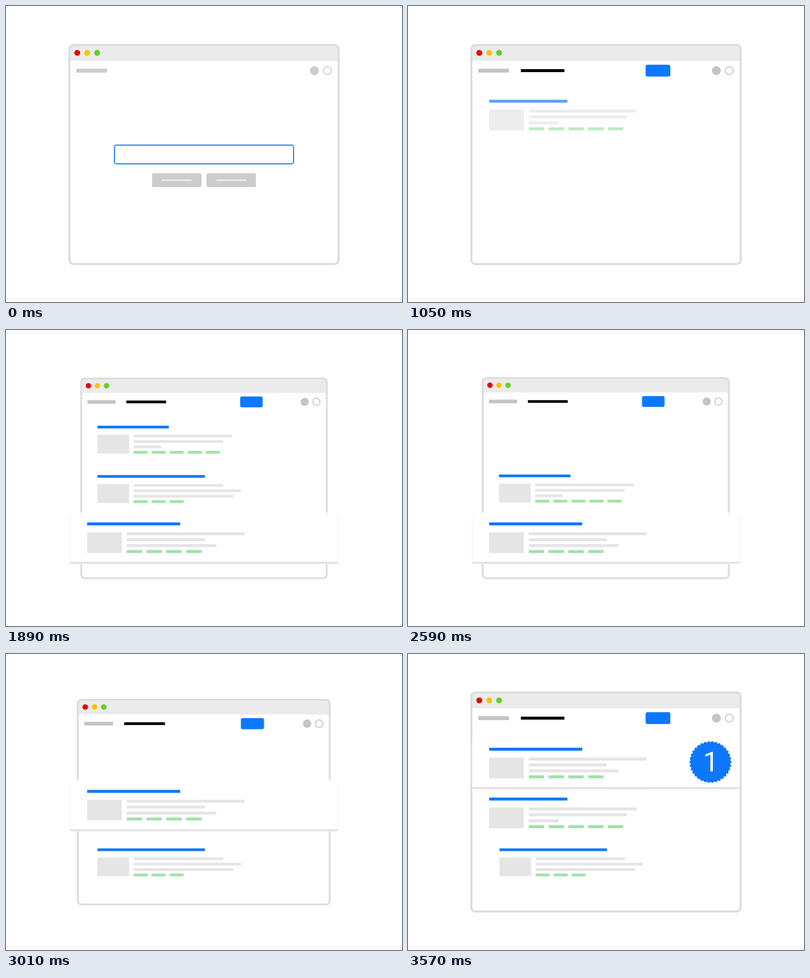
An HTML page that plays this animation: 800 by 600 pixels, repeating every 8000 ms.

```html
<!DOCTYPE html>
<html lang="en">
<head>
<meta charset="utf-8">
<title>Search ranking</title>
<style>
  html, body { margin: 0; width: 100%; height: 100%; overflow: hidden; background: #fff; }
  svg { display: block; width: 800px; height: 600px; }

  [class] { animation: 8s linear infinite both; }
  .type   { animation-name: type; transform-origin: 234px 300px; }
  .home   { animation-name: leave; }
  .bar    { animation-name: enter; }
  .greys  { animation-name: greys; }
  .window { animation-name: window; transform-origin: 400px 298px; }
  .first  { animation-name: first; transform-origin: 400px 236px; }
  .second { animation-name: second; transform-origin: 400px 336px; }
  .third  { animation-name: rise; }
  .card   { animation-name: lift; }
  .badge  { animation-name: badge; }
  .result { animation-name: appear; }
  .second .result { animation-delay: 140ms; }
  .third .result  { animation-delay: 280ms; }

  @keyframes type { 0% { transform: scaleX(0); } 7%, 100% { transform: none; } }
  @keyframes leave { 0%, 8.75% { opacity: 1; } 10.5%, 100% { opacity: 0; } }
  @keyframes enter { 0%, 8.75% { opacity: 0; } 10.5%, 100% { opacity: 1; } }
  @keyframes greys { 0%, 8.75% { color: #ccc; } 10.5%, 100% { color: #c4c4c4; } }
  @keyframes appear { 0%, 11.375% { opacity: 0; } 14%, 100% { opacity: 1; } }
  @keyframes lift { 0%, 19.25% { opacity: 0; } 23.625%, 100% { opacity: 1; } }
  @keyframes badge { 0%, 42.875% { opacity: 0; } 44.625%, 100% { opacity: 1; } }

  @keyframes window {
    0%, 19.25% { transform: translate(0, 0) scale(1); }
    23.625%, 32.37% { transform: translate(0, 0) scale(.912); }
    32.375%, 36.75% { transform: translate(-.5px, -.5px) scale(.914); }
    40.25%, 100% { transform: translate(0, -1px) scale(1); }
  }
  @keyframes first {
    0%, 19.25% { transform: translate(0, 0) scale(1); }
    23.625%, 32.37% { transform: translate(0, 0) scale(.912); }
    32.375%, 36.75% { transform: translate(-.5px, 99px) scale(.914); }
    40.25%, 100% { transform: translate(0, 101px) scale(1); }
  }
  @keyframes second {
    0%, 19.25% { transform: translate(0, 0) scale(1); opacity: 1; }
    23.625%, 32.37% { transform: translate(0, 0) scale(.912); opacity: 1; }
    32.375%, 36.74% { transform: translate(0, 100px) scale(.912); opacity: 0; }
    36.75%, 100% { transform: translate(0, 100px) scale(.912); opacity: 1; }
  }
  /* quadratic ease in, then out */
  @keyframes rise {
    0% { transform: translateY(0); }
    32.978% { transform: translateY(0); animation-timing-function: cubic-bezier(.3333, 0, .6667, .3333); }
    37.297% { transform: translateY(-100px); animation-timing-function: cubic-bezier(.3333, .6667, .6667, 1); }
    41.616%, 100% { transform: translateY(-200px); }
  }
</style>
</head>
<body>
<svg viewBox="0 0 800 600">
  <defs>
    <linearGradient id="shade" x2="0" y2="1">
      <stop offset=".94" stop-color="#ececec"/>
      <stop offset=".95" stop-color="#d8d8d8"/>
      <stop offset=".98" stop-color="#ebebeb"/>
      <stop offset="1" stop-color="#f0f0f0"/>
    </linearGradient>
  </defs>

  <g class="window">
    <rect x="128" y="79" width="544" height="444" rx="8" fill="#fff"/>
    <path d="M130 111V87q0-6 6-6H664q6 0 6 6V111z" fill="#ebebeb"/>
    <rect x="128" y="79" width="544" height="444" rx="8" fill="none" stroke="#dcdcdc" stroke-width="4"/>
    <circle cx="144" cy="95" r="6" fill="#e40600"/>
    <circle cx="164" cy="95" r="6" fill="#ffc200"/>
    <circle cx="184" cy="95" r="6" fill="#5fd21f"/>

    <g class="greys" fill="currentColor">
      <rect x="142" y="127" width="62" height="8"/>
      <circle cx="623" cy="131" r="9"/>
      <circle cx="649" cy="131" r="8" fill="#fff" stroke="currentColor" stroke-width="2"/>
    </g>

    <g class="home">
      <rect x="219" y="282" width="362" height="38" rx="4" fill="#fff" stroke="#0d78ff" stroke-width="2"/>
      <rect class="type" x="234" y="296" width="100" height="8"/>
      <g fill="#ccc">
        <rect x="295" y="339" width="100" height="28" rx="4"/>
        <rect x="405" y="339" width="100" height="28" rx="4"/>
      </g>
      <path d="M315 353h60M425 353h60" stroke="#e5e5e5" stroke-width="4"/>
    </g>

    <g class="bar">
      <rect x="228" y="128" width="88" height="6"/>
      <rect x="480" y="119" width="50" height="24" rx="4" fill="#0d78ff"/>
    </g>
  </g>

  <g class="first"></g>
  <g class="second"></g>
  <g class="third">
    <g class="card">
      <rect x="129" y="374" width="542" height="101" rx="6" fill="url(#shade)"/>
      <rect x="130" y="370" width="540" height="100" fill="#fff"/>
    </g>
  </g>

  <g class="badge">
    <polygon id="star" fill="#0d78ff"/>
    <text x="596.1" y="238" font-family="Roboto, sans-serif" font-size="56" fill="#fff">1</text>
  </g>
</svg>
<script>
  const $ = s => document.querySelector(s);
  const bar = (x, y, w, fill, h = 6) =>
    `<rect x="${x}" y="${y}" width="${w}" height="${h}" fill="${fill}"/>`;

  function addResult(parent, y, title, lines, tags) {
    let out = bar(164, y, title, '#0d78ff') + bar(164, y + 20, 70, '#e5e5e5', 42);
    lines.forEach((w, i) => out += bar(244, y + 20 + 12 * i, w, '#e5e5e5'));
    for (let i = 0; i < tags; i++) out += bar(244 + 40 * i, y + 56, 31, '#9fe2a6');
    $(parent).insertAdjacentHTML('beforeend', `<g class="result">${out}</g>`);
  }
  addResult('.first', 190, 158, [218, 198, 61], 5);
  addResult('.second', 290, 238, [198, 238, 221], 3);
  addResult('.third', 390, 188, [238, 158, 181], 4);

  const teeth = 34;
  $('#star').setAttribute('points', Array.from({ length: teeth * 2 }, (_, i) => {
    const a = Math.PI * i / teeth, r = i % 2 ? 40 : 43;
    return [611 + r * Math.cos(a), 219 + r * Math.sin(a)].map(v => v.toFixed(2));
  }).join(' '));

  // Run every animation on one clock that ticks each 70 ms.
  const LOOP = 8000, TICK = 70;
  const parts = document.getAnimations();
  parts.forEach(p => p.pause());
  const start = performance.now();
  function draw() {
    const t = (performance.now() - start) % LOOP;
    const time = Math.floor(t / TICK) * TICK;
    parts.forEach(p => p.currentTime = time);
    requestAnimationFrame(draw);
  }
  draw();
</script>
</body>
</html>
```
